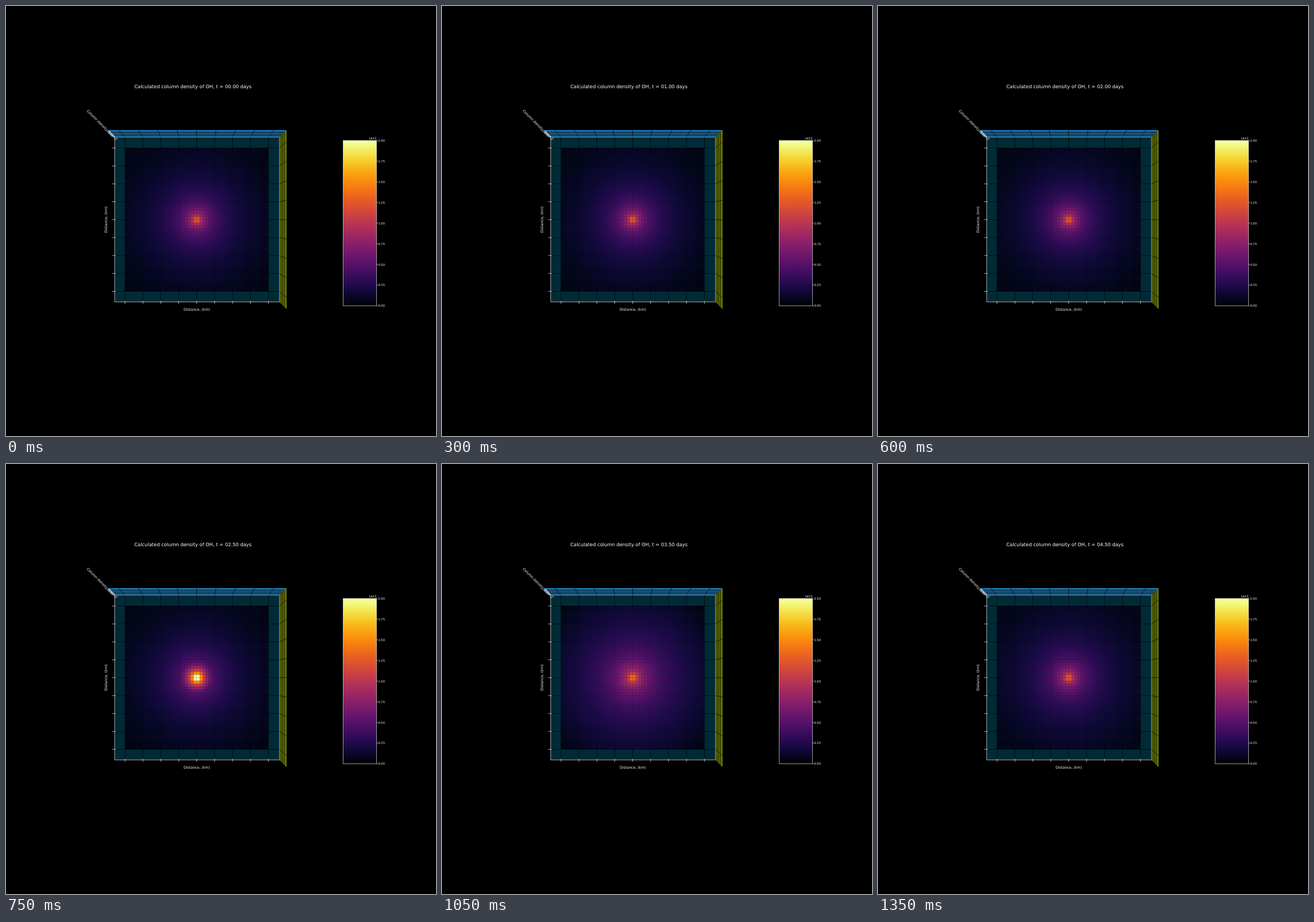
Animation of 748 by 748 pixels, one loop 1500 ms. Source, as an HTML page:

```html
<!DOCTYPE html>
<html lang="en">
<head>
<meta charset="utf-8">
<style>
  html, body { margin: 0; width: 100%; height: 100%; overflow: hidden; background: #000; }
  svg { display: block; width: 748px; height: 748px; }
  text { font-family: "DejaVu Sans", sans-serif; fill: #fff; text-rendering: geometricPrecision; white-space: pre; }
</style>
</head>
<body>
<svg id="stage" viewBox="0 0 748 748"></svg>
<script>
const stage = document.getElementById("stage");
const STEP_MS = 150, STEPS = 10;
const CELLS = 48, LEFT = 207, TOP = 247, SIZE = 249.4;
const CX = 332.3, CY = 371.5, FLOOR = 143.3, RIM = 155.5;
const SURFACE_X = LEFT + SIZE / 2, SURFACE_Y = TOP + SIZE / 2;

function add(tag, attrs, parent = stage) {
  const node = document.createElementNS("http://www.w3.org/2000/svg", tag);
  for (const key in attrs) node.setAttribute(key, attrs[key]);
  return parent.appendChild(node);
}
function path(d, stroke, width = 0.6, fill = "none") {
  return add("path", { d, stroke, "stroke-width": width, fill });
}
function label(string, x, y, size, anchor = "middle", angle = 0) {
  const node = add("text", {
    x, y, "font-size": size, "text-anchor": anchor, transform: `rotate(${angle} ${x} ${y})`
  });
  node.textContent = string;
  return node;
}

// Polynomial fit of the inferno colour map, one row per channel.
const INFERNO = [
  [0.0002, 0.1065, 11.6025, -41.704, 77.1629, -71.3194, 25.1311],
  [0.0017, 0.564, -3.9729, 17.4364, -33.4024, 32.6261, -12.2427],
  [-0.0195, 3.9327, -15.9424, 44.3541, -81.8073, 73.2095, -23.0703]
];
function inferno(v) {
  const t = Math.min(1, Math.max(0, v));
  const rgb = INFERNO.map(c => {
    const level = c.reduceRight((sum, k) => sum * t + k, 0);
    return Math.round(255 * Math.min(1, Math.max(0, level)));
  });
  return `rgb(${rgb})`;
}

// Modified Bessel function K0, integrated numerically.
function besselK0(x) {
  let sum = 0.5 * Math.exp(-x);
  for (let u = 0.1; u < 7; u += 0.1) sum += Math.exp(-x * Math.cosh(u));
  return sum * 0.1;
}
const dome = (height, radius) => r => height * Math.max(0, 1 - (r / radius) ** 2);
const quiet = () => 0;
const outburst = [
  quiet, quiet, quiet, quiet, quiet,
  r => 0.5 * Math.max(0, Math.log(27 / r)),
  dome(0.37, 84),
  dome(0.125, 170),
  dome(0.03, 230),
  dome(0.02, 230)
];

function drawPanes() {
  const corner = (half, sx, sy) => `${CX + sx * half} ${CY + sy * half}`;
  const tl = corner(FLOOR, -1, -1), tr = corner(FLOOR, 1, -1);
  const br = corner(FLOOR, 1, 1), bl = corner(FLOOR, -1, 1);
  const outerTl = corner(RIM, -1, -1), outerTr = corner(RIM, 1, -1), outerBr = corner(RIM, 1, 1);
  path(`M${tl}L${tr}L${br}L${bl}Z`, "none", 0, "#002b36");
  path(`M${outerTl}L${outerTr}L${tr}L${tl}Z`, "none", 0, "#268bd2");
  path(`M${outerTr}L${outerBr}L${br}L${tr}Z`, "none", 0, "#859900");

  const spread = RIM / FLOOR, near = CX - FLOOR, far = CX + FLOOR;
  for (let i = 0; i <= 8; i++) {
    const x = LEFT + i * SIZE / 8, y = TOP + i * SIZE / 8;
    path(`M${x} ${CY + FLOOR}V${CY - FLOOR}L${CX + (x - CX) * spread} ${CY - RIM}`, "#000", 0.7);
    path(`M${near} ${y}H${far}L${CX + RIM} ${CY + (y - CY) * spread}`, "#000", 0.7);
  }
  for (let k = 0; k < 8; k++) {
    const half = FLOOR + 1.2 + k * 1.25;
    path(`M${CX - half} ${CY - half}H${CX + half}V${CY + half}`, "#000", 0.6);
  }

  path(`M${tl}L${tr}L${br}`, "#a3b5b5", 0.6);
  path(`M${outerTl}L${tl}L${bl}L${br}`, "#fff", 0.65);
  for (let i = 0; i <= 8; i++) {
    const x = LEFT + i * SIZE / 8, y = TOP + i * SIZE / 8;
    path(`M${x} 512.6V518.2M${near - 4.4} ${y}H${near + 2}`, "#fff", 0.65);
  }
  for (let k = 0; k < 8; k++) {
    const half = FLOOR + 1.2 + k * 1.25;
    path(`M${CX - half - 4} ${CY - half}h6`, "#fff", 0.55);
  }
}

function drawSurface() {
  const cells = [], side = SIZE / CELLS, group = add("g", {});
  for (let row = 0; row < CELLS; row++) {
    for (let col = 0; col < CELLS; col++) {
      const x = LEFT + col * side, y = TOP + row * side;
      const r = Math.hypot(x + side / 2 - SURFACE_X, y + side / 2 - SURFACE_Y);
      const node = add("rect", { x, y, width: side, height: side }, group);
      cells.push({ node, r, base: 0.364 * besselK0(r / 88) });
    }
  }
  return cells;
}

function drawColorbar() {
  const x = 586.5, y = 234, width = 58, height = 287.5;
  const gradient = add("linearGradient", { id: "scale", x1: 0, y1: 1, x2: 0, y2: 0 });
  for (let i = 0; i <= 64; i++) {
    add("stop", { offset: i / 64, "stop-color": inferno(i / 64) }, gradient);
  }
  add("rect", { x, y, width, height, fill: "url(#scale)", stroke: "#fff", "stroke-width": 0.6 });
  for (let i = 0; i <= 8; i++) {
    const tickY = y + height * (1 - i / 8);
    path(`M${x + width} ${tickY}h2.5`, "#fff");
    label((i / 4).toFixed(2), 647.4, tickY + 1.9, 5.2, "start");
  }
  label("1e13", 644.3, 232.4, 5.2, "end");
}

drawPanes();
const cells = drawSurface();
drawColorbar();
label("Distance, (km)", 332, 530.3, 6.25);
label("Distance, (km)", 175.6, 371.5, 6.25, "middle", -90);
label("Column density, 1/cm2", 165.6, 208.6, 6.25, "middle", 45);
const title = label("", 325.2, 142.9, 8.33);

let shown = -1;
function render(now) {
  const step = Math.floor(now / STEP_MS) % STEPS;
  if (step !== shown) {
    shown = step;
    const days = (step / 2).toFixed(2).padStart(5, "0");
    title.textContent = `Calculated column density of OH, t = ${days} days`;
    for (const cell of cells) {
      cell.node.setAttribute("fill", inferno((cell.base + outburst[step](cell.r)) / 2));
    }
  }
}

const start = performance.now();
function tick() {
  render(performance.now() - start);
  requestAnimationFrame(tick);
}
tick();
</script>
</body>
</html>
```
